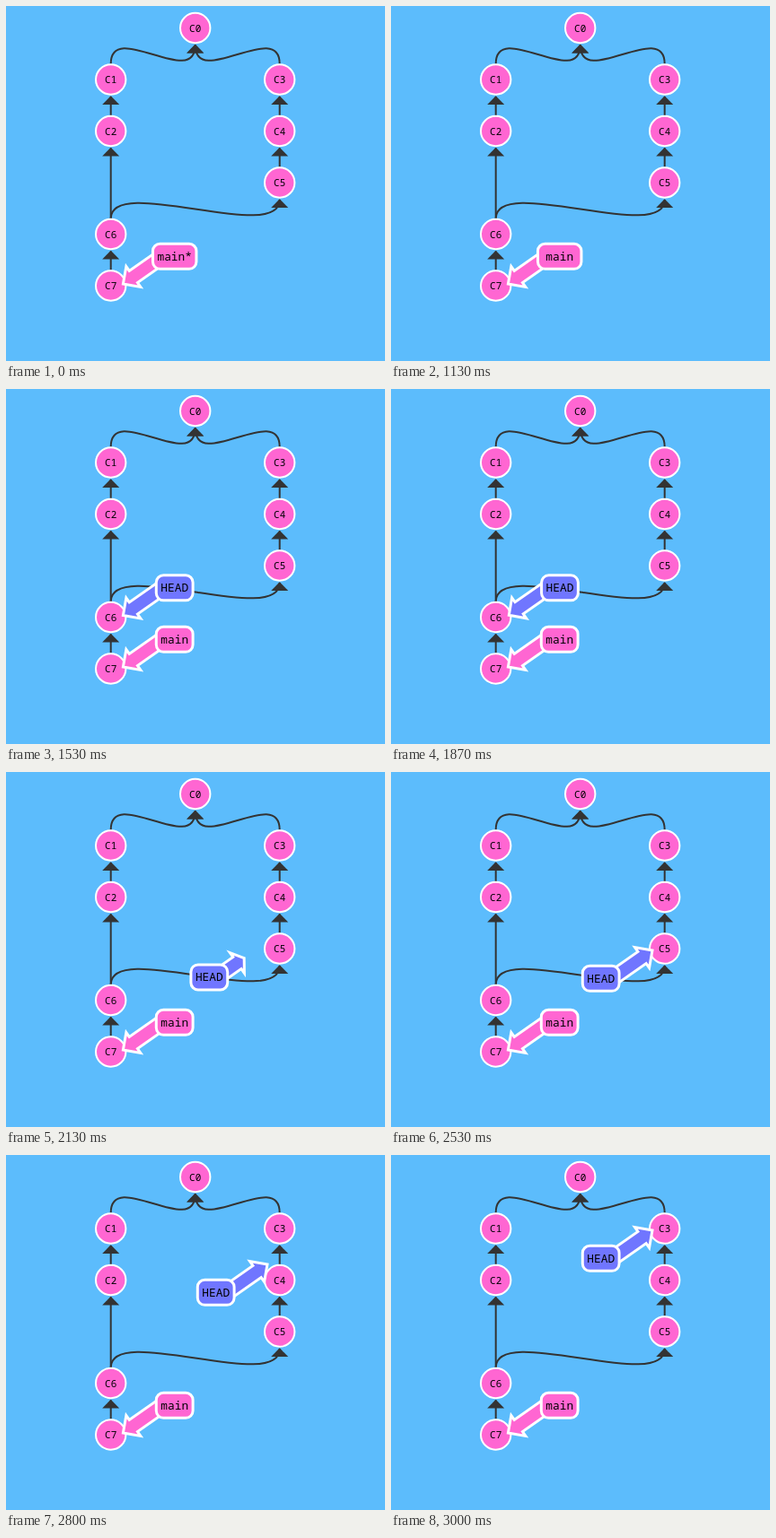
Recreate the animation shown at these times as an HTML page. Size 422 by 396 pixels, loop 4.79 s.

```html
<!DOCTYPE html>
<html lang="en">
<head>
<meta charset="utf-8">
<title>Commit graph</title>
<style>
  html, body { margin: 0; width: 100%; height: 100%; overflow: hidden; background: #5cbcfc; }
  svg { display: block; width: 422px; height: 396px; }
  text { font-family: "Noto Sans Mono", "DejaVu Sans Mono", monospace; text-anchor: middle; fill: #000; }
  .node circle { fill: #ff66d2; stroke: #fff; stroke-width: 2; }
  .node text { font-size: 11px; }
  .edge { fill: none; stroke: #333; stroke-width: 2; }
  .head { fill: #333; }
  .tag path, .tag rect { stroke: #fff; stroke-width: 3; }
  .tag text { font-size: 12.83px; }
</style>
</head>
<body>
<svg id="stage" viewBox="0 0 422 396"></svg>
<script>
const LOOP = 4790, STEP = 200 / 3, MOVE = 400;
const PINK = '#ff66d2', VIOLET = '#7076ff';
const stage = document.getElementById('stage');

function add(parent, name, attrs, text) {
  const el = document.createElementNS('http://www.w3.org/2000/svg', name);
  set(el, attrs);
  if (text) el.textContent = text;
  return parent.appendChild(el);
}

function set(el, attrs) {
  for (const key in attrs) el.setAttribute(key, attrs[key]);
}

const place = (col, row) => ({ x: 116.7 + col * 94, y: 24.5 + row * 57.5 });

// column and row of each commit, in order of its number
const commits = [[1, 0], [0, 1], [0, 2], [2, 1], [2, 2], [2, 3], [0, 4], [0, 5]]
  .map(([col, row]) => place(col, row));

// child, parent
const links = [[1, 0], [3, 0], [2, 1], [4, 3], [5, 4], [6, 2], [6, 5], [7, 6]];

for (const [child, parent] of links) {
  const a = commits[child], b = commits[parent];
  const y0 = a.y - 17.5, y1 = b.y + 19;
  add(stage, 'path', {
    class: 'edge',
    d: `M${a.x},${y0}C${a.x},${y0 - 50} ${b.x},${y1 + 50} ${b.x},${y1}`
  });
  add(stage, 'path', { class: 'head', d: `M${b.x},${y1 - 0.8}l9.5,9.8h-19z` });
}

commits.forEach((c, i) => {
  const g = add(stage, 'g', { class: 'node' });
  add(g, 'circle', { cx: c.x, cy: c.y, r: 16.7 });
  add(g, 'text', { x: c.x, y: c.y + 4 }, 'C' + i);
});

function makeTag(fill) {
  const g = add(stage, 'g', { class: 'tag' });
  return {
    arrow: add(g, 'path', { fill }),
    box: add(g, 'rect', { fill, height: 28, rx: 8 }),
    text: add(g, 'text', {})
  };
}

// side is 1 to the right of the commit, -1 to the left, and slides between them
function drawTag(tag, { x, y, side, width, opacity, label }) {
  const px = d => x + side * d;
  const points = [[10, 0], [24, -14], [24, -8], [73, -8], [73, 8], [24, 8], [24, 14]]
    .map(([dx, dy]) => `${px(dx)},${y + dy}`);
  set(tag.arrow, {
    d: `M${points.join('L')}Z`,
    transform: `translate(${-2 * side} ${-20 * side}) rotate(-35 ${px(41.5)} ${y})`,
    opacity
  });
  const cx = px(71), cy = y - 33 * side + 0.3;
  set(tag.box, { x: cx - width / 2, y: cy - 14, width, opacity });
  set(tag.text, { x: cx, y: cy + 4.3, opacity });
  if (tag.text.textContent !== label) tag.text.textContent = label;
}

function ease(n) {
  const q = 0.48 - n / 1.04, r = Math.sqrt(0.1734 + q * q);
  const t = Math.cbrt(r - q) + Math.cbrt(-r - q) + 0.5;
  return (1 - t) * 3 * t * t + t * t * t;
}

function progress(time, start) {
  const n = (time - start) / MOVE;
  return n <= 0 ? 0 : n >= 1 ? 1 : ease(n);
}

const mix = (a, b, p) => a + (b - a) * p;

const stops = [[7, -1], [6, 1], [5, -1], [3, -1]]
  .map(([commit, side]) => ({ ...commits[commit], side }));
const starts = [1125, 1845, 2560];

const mainTag = makeTag(PINK), headTag = makeTag(VIOLET);

function render(ms) {
  const time = Math.floor((ms % LOOP + 4) / STEP) * STEP;
  const born = progress(time, starts[0]);
  drawTag(mainTag, {
    ...commits[7], side: 1, opacity: 1,
    width: mix(48.5, 40.8, born),
    label: time > starts[0] ? 'main' : 'main*'
  });

  let leg = 0;
  while (leg < 2 && time >= starts[leg + 1]) leg++;
  const p = progress(time, starts[leg]), from = stops[leg], to = stops[leg + 1];
  drawTag(headTag, {
    x: mix(from.x, to.x, p),
    y: mix(from.y, to.y, p),
    side: mix(from.side, to.side, p),
    width: 40.8, opacity: born, label: 'HEAD'
  });
}

const begin = performance.now();
function tick() {
  render(performance.now() - begin);
  requestAnimationFrame(tick);
}
tick();
</script>
</body>
</html>
```
